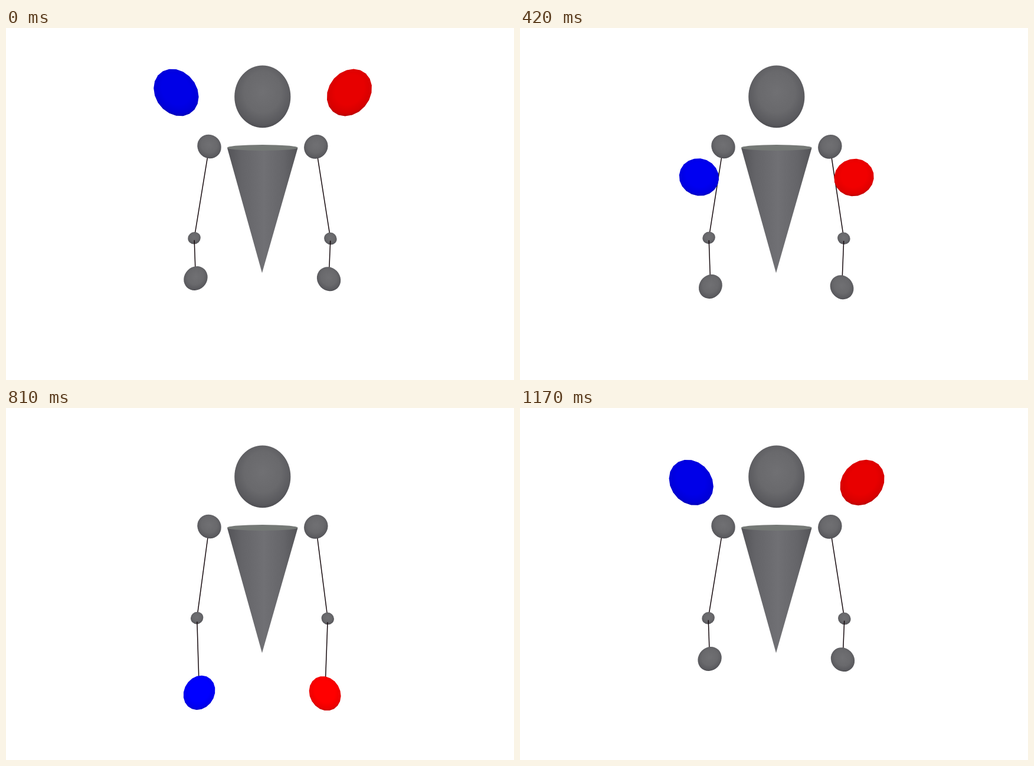
Write an HTML page that moves like this. It is 861 by 597 pixels and loops after 1.2 s.

```html
<!DOCTYPE html>
<html lang="en">
<head>
<meta charset="utf-8">
<title>Juggling figure</title>
<style>
  html, body { margin: 0; width: 100%; height: 100%; overflow: hidden; background: #fff; }
  svg { display: block; width: 861px; height: 597px; }
</style>
</head>
<body>
<svg id="stage" viewBox="0 0 861 597">
  <defs>
    <radialGradient id="grey" cx=".5" cy=".43" r=".6">
      <stop offset="0" stop-color="#707073"/>
      <stop offset=".55" stop-color="#69696c"/>
      <stop offset=".85" stop-color="#5a5a5e"/>
      <stop offset="1" stop-color="#48484d"/>
    </radialGradient>
    <radialGradient id="shade" cx=".5" cy=".44" r=".58">
      <stop offset=".55" stop-color="#000" stop-opacity="0"/>
      <stop offset=".85" stop-color="#000" stop-opacity=".07"/>
      <stop offset="1" stop-color="#000" stop-opacity=".25"/>
    </radialGradient>
    <linearGradient id="side">
      <stop offset="0" stop-color="#545458"/>
      <stop offset=".2" stop-color="#646468"/>
      <stop offset=".52" stop-color="#707074"/>
      <stop offset=".8" stop-color="#656569"/>
      <stop offset="1" stop-color="#545458"/>
    </linearGradient>
  </defs>
  <ellipse cx="434.8" cy="116.4" rx="47.6" ry="52.9" fill="url(#grey)"/>
  <path d="M375 203.5 L434 415.5 L494.5 203.5 Z" fill="url(#side)"/>
  <ellipse cx="434.7" cy="203" rx="59.8" ry="5" fill="#757976"/>
</svg>
<script>
const NS = 'http://www.w3.org/2000/svg';
const stage = document.getElementById('stage');
const CX = 434.5, CY = 298.5, FOCAL = 348;
const LOOP = 1200, STEP = 30, PEAK = 120;
const TOP = -1.4745, GRAVITY = 1.2522e-5;
const CATCH = 604.5, THROW = 841.8;

function add(parent, tag, attrs) {
  const el = document.createElementNS(NS, tag);
  for (const k in attrs) el.setAttribute(k, attrs[k]);
  parent.appendChild(el);
  return el;
}

const set = (el, attrs) => { for (const k in attrs) el.setAttribute(k, attrs[k]); };

// Heights are measured downward from the camera axis.
const flight = u => TOP + GRAVITY * u * u;
const reach = u => 1.1045 + 8e-5 * u + 1.4e-6 * u * u;

function carry(t) {
  const span = THROW - CATCH, s = (t - CATCH) / span, r = 1 - s;
  const u0 = CATCH - PEAK, u1 = THROW - PEAK - LOOP;
  const v0 = 2 * GRAVITY * u0 * span, v1 = 2 * GRAVITY * u1 * span;
  return flight(u0) * r * r * (1 + 2 * s) + flight(u1) * s * s * (3 - 2 * s)
    + v0 * s * r * r - v1 * s * s * r;
}

function project(h) {
  const z = 0.00792 + 0.00083 * h;
  return { x: CX - 1 / z, y: CY + h / z, z };
}

// The right side mirrors the left with a slight camera roll.
function place(p, right) {
  if (!right) return p;
  return { x: 2 * CX - p.x + 2 - 0.0058 * p.y, y: p.y + 0.0036 * (p.y - 100) };
}

// A sphere seen off axis stretches away from the centre of view.
function sphere(el, p, r) {
  const dx = p.x - CX, dy = p.y - CY, d2 = dx * dx + dy * dy;
  const k = (Math.sqrt(1 + d2 / FOCAL ** 2) - 1) / d2;
  const a = r * (1 + k * dx * dx), b = r * k * dx * dy, d = r * (1 + k * dy * dy);
  el.setAttribute('transform', `matrix(${a} ${b} ${b} ${d} ${p.x} ${p.y})`);
}

const ring = Array.from({ length: 20 }, (_, i) => {
  const a = (i + 0.3) * Math.PI / 10;
  return `${(1.012 * Math.cos(a)).toFixed(4)},${(1.012 * Math.sin(a)).toFixed(4)}`;
}).join(' ');

function makeArm(right) {
  const g = add(stage, 'g', {});
  const line = () => add(g, 'line', { stroke: '#160a0e', 'stroke-width': 1.5 });
  const dot = () => add(g, 'circle', { r: 1, fill: 'url(#grey)' });
  const upper = line(), shoulder = dot(), elbow = dot(), fore = line(), hand = dot();
  const ball = add(g, 'g', {});
  const skin = add(ball, 'polygon', { points: ring });
  add(ball, 'polygon', { points: ring, fill: 'url(#shade)' });
  return { right, upper, shoulder, elbow, fore, hand, ball, skin };
}

const arms = [makeArm(false), makeArm(true)];

function drawArm(arm, handH, ballH) {
  const at = p => place(p, arm.right);
  const bend = handH - 1.11;
  const hp = project(handH), bp = project(ballH);
  const s = at({ x: 344.5, y: 201 });
  const e = at({ x: 319 + 7.6 * bend, y: 356.3 - 4 * bend + 6 * bend * bend });
  const h = at(hp), b = at(bp);
  const start = 3.5 + 4.5 * Math.max(0, bend);
  const f = start / (h.y - e.y);

  sphere(arm.shoulder, s, 19.6);
  sphere(arm.elbow, e, 10.2);
  sphere(arm.hand, h, 0.17 / hp.z);
  sphere(arm.ball, b, 0.238 / bp.z);
  set(arm.upper, { x1: s.x, y1: s.y, x2: e.x, y2: e.y });
  set(arm.fore, { x1: e.x + (h.x - e.x) * f, y1: e.y + start, x2: h.x, y2: h.y });

  const lit = Math.round(Math.min(255, 244 + 10 * ballH));
  arm.skin.setAttribute('fill', arm.right ? `rgb(${lit},0,0)` : `rgb(0,0,${lit})`);
}

function render(now) {
  const t = Math.floor((now % LOOP) / STEP) * STEP;
  const held = t >= CATCH && t <= THROW;
  const u = (t > THROW ? t - LOOP : t) - PEAK;
  const ballH = held ? carry(t) : flight(u);
  const handH = held ? ballH : reach(u);
  for (const arm of arms) drawArm(arm, handH, ballH);
}

function tick() {
  render(performance.now());
  requestAnimationFrame(tick);
}
tick();
</script>
</body>
</html>
```
